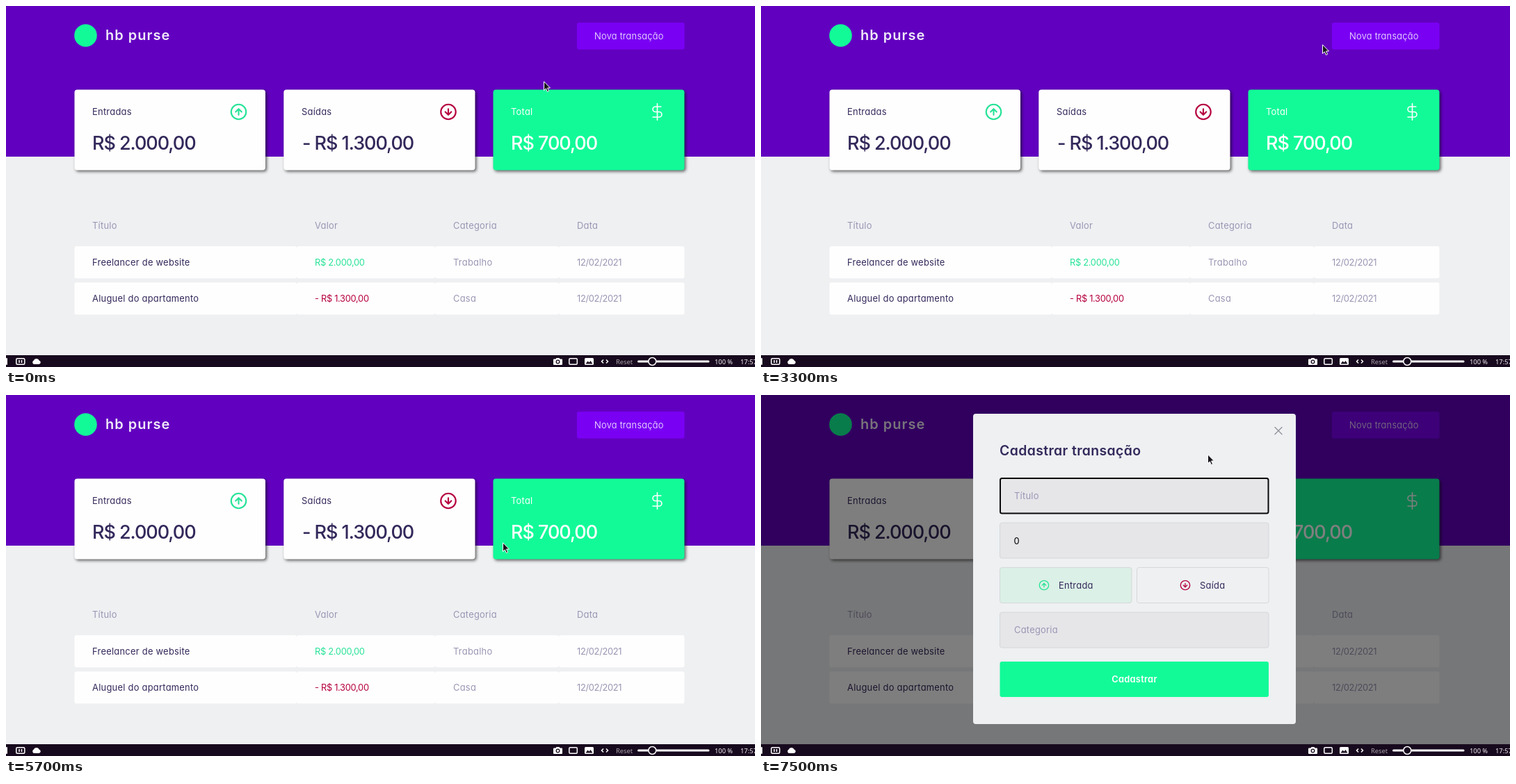
An HTML page that plays this animation: 1077 px wide and 520 px high, repeating every 8 s.

```html
<!DOCTYPE html>
<html lang="pt-BR">
<head>
<meta charset="utf-8">
<title>Transações</title>
<style>
  html, body { margin: 0; width: 100%; height: 100%; overflow: hidden; background: #eef0f2; }
  svg { display: block; width: 100vw; height: 100vh; }
  text {
    font: 400 12.9px Inter, "Open Sans", sans-serif;
    font-feature-settings: "cv11";
    letter-spacing: .02em;
    fill: #33295b;
    white-space: pre;
  }
  text.num { letter-spacing: -.025em; }
  text.big { font-size: 27px; font-weight: 500; letter-spacing: -.039em; }
  text.soft { fill: #9a95b3; }
  text.white { fill: #fff; }
  text.in { fill: #27e398; }
  text.out { fill: #b5003f; }
  text.bar { font: 9.3px "Noto Sans", sans-serif; letter-spacing: 0; fill: #f2f0f3; }
  .card { filter: drop-shadow(2px 2px 2px rgba(0, 0, 0, .6)); }
  .line { fill: none; stroke-width: 2; stroke-linecap: round; stroke-linejoin: round; }
  .up { stroke: #27e398; }
  .down { stroke: #b5003f; }
  .field { fill: #e6e6e9; stroke: #d5d7d9; }
</style>
</head>
<body>
<svg viewBox="0 0 1077 520" preserveAspectRatio="none">
  <defs>
    <g id="arrow"><circle r="10"/><path d="M4 0 0-4-4 0M0 4V-4"/></g>
    <path id="dollar" d="M0-11V11M5-7H-2.5a3.5 3.5 0 0 0 0 7h5a3.5 3.5 0 0 1 0 7H-6"/>
  </defs>

  <rect width="1077" height="503" fill="#eef0f2"/>
  <rect width="1077" height="217" fill="#6200c0"/>
  <circle cx="114.5" cy="42.5" r="16.3" fill="#12fa98"/>
  <text class="white" x="143" y="49" style="font-size:20px;font-weight:600;letter-spacing:.05em;fill:#f0eaf8">hb purse</text>
  <rect id="button" x="821" y="24" width="154.5" height="38.5" rx="3"/>
  <text id="label" class="white" x="846" y="47.5" style="font-weight:300">Nova transação</text>

  <g class="card" fill="#fffefe">
    <rect x="98.5" y="120.5" width="274.5" height="116" rx="4"/>
    <rect x="399.3" y="120.5" width="275.2" height="116" rx="4"/>
    <rect x="700.5" y="120.5" width="275" height="116" rx="4" fill="#12fa98"/>
  </g>
  <text x="124" y="157">Entradas</text>
  <text x="425" y="157">Saídas</text>
  <text class="white" x="726" y="157">Total</text>
  <text class="big" x="124" y="207">R$ 2.000,00</text>
  <text class="big" x="426" y="207">- R$ 1.300,00</text>
  <text class="big white" x="726" y="207">R$ 700,00</text>
  <use href="#arrow" class="line up" transform="translate(334.5 152.5) scale(1.075)"/>
  <use href="#arrow" class="line down" transform="translate(636 152.5) scale(1.075 -1.075)"/>
  <use href="#dollar" class="line" stroke="#fff" style="stroke-width:1.5" transform="translate(936.5 152.5) scale(1.075)"/>

  <g id="table"></g>

  <g id="modal">
    <rect width="1077" height="503" opacity=".5"/>
    <rect x="305" y="27" width="464" height="447" rx="4" fill="#eef0f2"/>
    <path d="m739 46.5 10 10m0-10-10 10" class="line" stroke="#93939c" style="stroke-width:1.4"/>
    <text x="343" y="86.5" style="font-size:19.4px;font-weight:600">Cadastrar transação</text>
    <g class="field">
      <rect x="343.5" y="120" width="386.5" height="50.5" rx="3"/>
      <rect x="343.5" y="184" width="386.5" height="51" rx="3"/>
      <rect x="343.5" y="248.5" width="189.5" height="51" rx="3" fill="#dbf0e6"/>
      <rect x="540.5" y="248.5" width="189.5" height="51" rx="3" fill="#eef0f2"/>
      <rect x="343.5" y="313" width="386.5" height="51" rx="3"/>
    </g>
    <rect x="343.5" y="384" width="386.5" height="51" rx="3" fill="#12fa98"/>
    <text class="soft" x="364" y="150.3">Título</text>
    <text x="363.5" y="214.5" style="fill:#000">0</text>
    <use href="#arrow" class="line up" transform="translate(407 274) scale(.67)"/>
    <text x="428" y="278.7">Entrada</text>
    <use href="#arrow" class="line down" transform="translate(610 274) scale(.67 -.67)"/>
    <text x="631" y="278.7">Saída</text>
    <text class="soft" x="364" y="343.3">Categoria</text>
    <text class="white" x="537" y="414.3" text-anchor="middle" style="font-weight:600">Cadastrar</text>
    <rect id="focus" x="344" y="120" width="385.5" height="50.5" rx="2.5" fill="none" stroke="#0b0b0d" stroke-width="2"/>
    <rect id="caret" x="364" y="137" width="1" height="17"/>
  </g>

  <rect y="503" width="1077" height="17" fill="#180a1e"/>
  <g fill="#fff">
    <rect y="507" width="2" height="10" rx="1"/>
    <path d="M40 516a3 3 0 0 1 0-5.5 4 4 0 0 1 7.500 0 2.800 2.800 0 0 1 0 5.500z"/>
    <path d="M788 508.500h2.500l1-1.500h4l1 1.500h2.500q1 0 1 1v6.500q0 1-1 1h-11q-1 0-1-1v-6.500q0-1 1-1z"/>
    <rect x="832" y="507" width="13" height="10" rx="1.500"/>
  </g>
  <g fill="none" stroke="#fff" stroke-width="1.500">
    <rect x="14.800" y="507.800" width="12" height="8.500" rx="1.500"/>
    <path d="M19 510v4M22.500 510v4"/>
    <rect x="809.800" y="507.800" width="11.500" height="8.500" rx="1.500"/>
    <path d="m859 509.500-2.500 2.500 2.500 2.500m4-5 2.500 2.500-2.500 2.500"/>
    <path d="M909.500 512H1010" stroke-width="3" stroke-linecap="round"/>
    <circle cx="929.300" cy="512" r="5.500" fill="#180a1e"/>
  </g>
  <circle cx="793.500" cy="512.500" r="2.300" fill="#fff" stroke="#180a1e" stroke-width="1.300"/>
  <path d="m833.500 515.500 3-4 2 2 2-2.500 3 4.500z" fill="#180a1e"/>
  <text class="bar" x="877" y="515.500" style="fill:#aaa4ad">Reset</text>
  <text class="bar" x="1019" y="515.500">100 %</text>
  <text class="bar" x="1056" y="515.500">17:57</text>

  <g id="cursor">
    <path id="pointer" d="M.5.8V13.600L3.400 10.900 5.400 15.500 7.600 14.500 5.600 10H9.500Z" fill="#17151a" stroke="#fff"/>
    <g id="beam" fill="none" stroke-linecap="square">
      <path d="M-2.500-7H2.500M0-7V7M-2.500 7H2.500" stroke="#fff" stroke-width="2.500"/>
      <path d="M-2.500-7H2.500M0-7V7M-2.500 7H2.500" stroke="#17151a"/>
    </g>
  </g>
</svg>
<script>
const $ = id => document.getElementById(id);
const show = (id, on) => $(id).style.display = on ? '' : 'none';

const edges = [98.5, 418, 617, 795, 975.5];
const columns = [124, 444, 643, 821];
const rows = [
  { y: 321, cells: ['Título', 'Valor', 'Categoria', 'Data'], styles: ['soft', 'soft', 'soft', 'soft'] },
  { y: 373.5, box: 346, cells: ['Freelancer de website', 'R$ 2.000,00', 'Trabalho', '12/02/2021'],
    styles: ['', 'num in', 'soft', 'num soft'] },
  { y: 426, box: 398.3, cells: ['Aluguel do apartamento', '- R$ 1.300,00', 'Casa', '12/02/2021'],
    styles: ['', 'num out', 'soft', 'num soft'] }
];
$('table').innerHTML = rows.map(({ y, box, cells, styles }) => cells.map((cell, i) =>
  (box ? `<rect x="${edges[i]}" y="${box}" width="${edges[i + 1] - edges[i]}" height="46.2" rx="3" fill="#fffefe"/>` : '') +
  `<text class="${styles[i]}" x="${columns[i]}" y="${y}">${cell}</text>`
).join('')).join('');

// Cursor stops: time, x, y
const path = [
  [0, 773, 108], [500, 773, 108], [600, 771, 109], [800, 771, 109],
  [1300, 708, 258], [1500, 708, 258], [1600, 707, 258], [1700, 707, 258],
  [2000, 702, 256], [2200, 702, 256], [2700, 843, 67], [2900, 848, 44], [3200, 848, 44],
  [3700, 325, 190], [3900, 283, 246], [4100, 275, 302], [4800, 520, 446],
  [5000, 547, 435], [5300, 565, 382], [5400, 565, 382],
  [6000, 863, 42], [6300, 863, 42], [6900, 600, 157], [7000, 600, 157],
  [7300, 642, 85], [8000, 642, 85]
];

// Velocity at a stop; zero where the cursor rests
function slope(i, k) {
  const a = path[i - 1], b = path[i], c = path[i + 1];
  const rests = (p, q) => p[1] === q[1] && p[2] === q[2];
  if (!a || !c || rests(a, b) || rests(b, c)) return 0;
  return (c[k] - a[k]) / (c[0] - a[0]);
}

function cursorAt(t) {
  const i = path.findIndex((p, n) => n === path.length - 1 || t < path[n + 1][0]);
  const a = path[i], b = path[i + 1] || a;
  const h = b[0] - a[0] || 1, u = (t - a[0]) / h, v = 1 - u;
  return [1, 2].map(k =>
    v * v * (1 + 2 * u) * a[k] + u * u * (3 - 2 * u) * b[k] +
    h * u * v * (v * slope(i, k) - u * slope(i + 1, k)));
}

const inside = (x, y, l, t, r, b) => x >= l && x < r && y >= t && y < b;

function draw(now) {
  const t = Math.floor(now % 8000 / 100) * 100;
  const [x, y] = cursorAt(t).map(Math.round);
  const open = t >= 6300;
  const hover = !open && inside(x, y, 821, 24, 976, 62);
  const typing = open && inside(x, y, 343, 119, 731, 171);

  $('button').setAttribute('fill', hover ? '#6c00d7' : '#7a00f4');
  $('label').setAttribute('opacity', hover ? .9 : 1);
  show('modal', open);
  show('focus', t >= 6900);
  show('caret', t >= 6900 && t < 7500);
  show('pointer', !typing);
  show('beam', typing);
  $('cursor').setAttribute('transform', `translate(${x} ${y})`);
  requestAnimationFrame(() => draw(performance.now() - start));
}

const start = performance.now();
draw(0);
</script>
</body>
</html>
```
